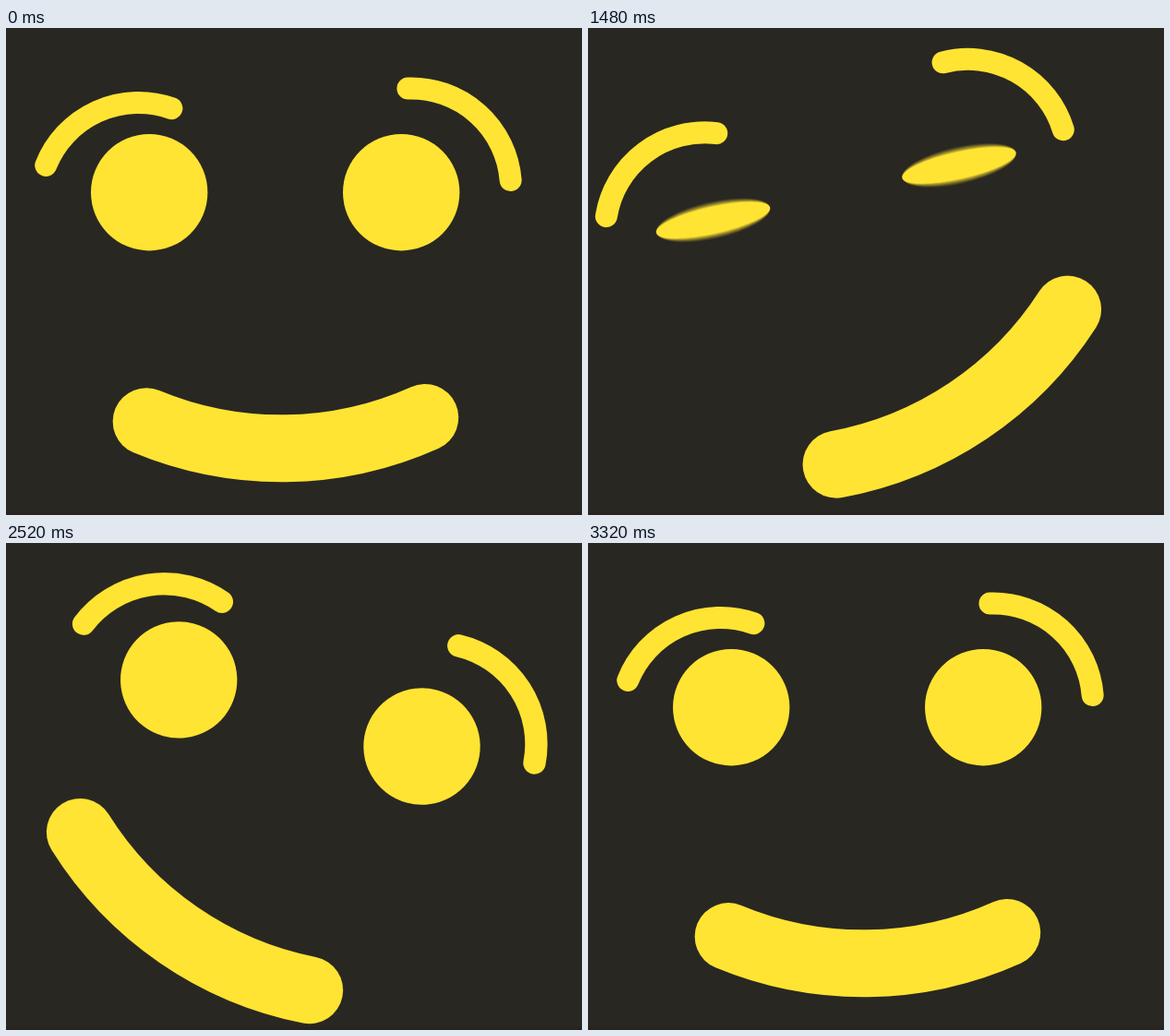
Animation, 624 px wide and 528 px high, one loop 3.68 s. Source, as an HTML page with a canvas:

```html
<!DOCTYPE html>
<html lang="en">
<head>
<meta charset="utf-8">
<title>Nodding face</title>
<style>
  html, body { margin: 0; width: 100%; height: 100%; overflow: hidden; background: #292722; }
  canvas { display: block; }
</style>
</head>
<body>
<canvas id="stage" width="624" height="528"></canvas>
<script>
const W = 624, H = 528;
const LOOP = 3680, STEP = 40;
const BACK = '#292722', EDGE = '#28231f', YELLOW = '#ffe433';
const RAD = Math.PI / 180;
const SAMPLES = 8, TURN_BLUR = 0.12, BLINK_BLUR = 0.65;

const ctx = document.getElementById('stage').getContext('2d');
const layer = document.createElement('canvas');
layer.width = W;
layer.height = H;
const pen = layer.getContext('2d');

// Soft step from 0 to 1, halfway at mid.
const ease = (f, mid, rate) => (1 + Math.tanh((f - mid) * rate / 2)) / 2;

// Tilts left, then over to the right, then back to rest.
function sway(f, left, right) {
  return -left * ease(f, 18.8, 0.6)
    + (left + right) * ease(f, 47.3, 0.39)
    - right * ease(f, 67.9, 0.6);
}

const browScale = f => 1 + 0.105 * (ease(f, 47.3, 0.6) - ease(f, 60, 0.6));

function blink(f, mid) {
  const s = Math.max(0, 1 - Math.abs(f - mid) / 4.5);
  return s * s * (3 - 2 * s);
}

const eyeOpen = f => 1 - 0.8 * (blink(f, 37.8) + blink(f, 78.5));

// Draws in a frame turned and scaled about a pivot.
function about(x, y, turn, scale, draw) {
  pen.save();
  pen.translate(x, y);
  pen.rotate(turn * RAD);
  pen.scale(scale, scale);
  pen.translate(-x, -y);
  draw();
  pen.restore();
}

function arc(x, y, r, from, to, width) {
  pen.lineWidth = width;
  pen.beginPath();
  pen.arc(x, y, r, from * RAD, to * RAD);
  pen.stroke();
}

function eye(x, y, open) {
  pen.beginPath();
  pen.ellipse(x, y, 63.2, 63.2 * open, 0, 0, 2 * Math.PI);
  pen.fill();
}

function drawFace(f, offset) {
  const pose = f + offset * TURN_BLUR;
  const open = eyeOpen(f + offset * BLINK_BLUR);
  const head = sway(pose, 13.1, 16.2);
  const jaw = sway(pose, 34.8, 36.9);

  pen.fillStyle = BACK;
  pen.fillRect(0, 0, W, H);
  pen.fillStyle = EDGE;
  pen.fillRect(0, 524, W, 4);

  pen.fillStyle = pen.strokeStyle = YELLOW;
  pen.lineCap = 'round';
  about(282, 282.3, head, 1, () => {
    eye(155.2, 178.2, open);
    eye(428.2, 178.2, open);
  });
  about(282, 282.3, head, browScale(pose), () => {
    arc(143.5, 189, 108, 201.8, 289.4, 24);
    arc(439, 173.5, 108, -91.9, -4.5, 24);
  });
  // The left corner of the mouth lifts a little with the tilt.
  about(292, 254.5, jaw, 1, () => {
    about(453.5, 422.5, Math.abs(jaw) * 0.0145, 1, () => {
      arc(298.1, 76, 379.8, 65.8, 112.6, 73);
    });
  });
}

// Averages a few moments around f for motion blur.
function render(f) {
  const count = f < 10 || f > 82 ? 1 : SAMPLES;
  for (let i = 0; i < count; i++) {
    drawFace(f, (i + 0.5) / count - 0.5);
    ctx.globalAlpha = 1 / (i + 1);
    ctx.drawImage(layer, 0, 0);
  }
  ctx.globalAlpha = 1;
}

const start = performance.now();
let shown = -1;
function tick() {
  const f = Math.floor((performance.now() - start) % LOOP / STEP);
  if (f !== shown) render(shown = f);
  requestAnimationFrame(tick);
}
tick();
</script>
</body>
</html>
```
